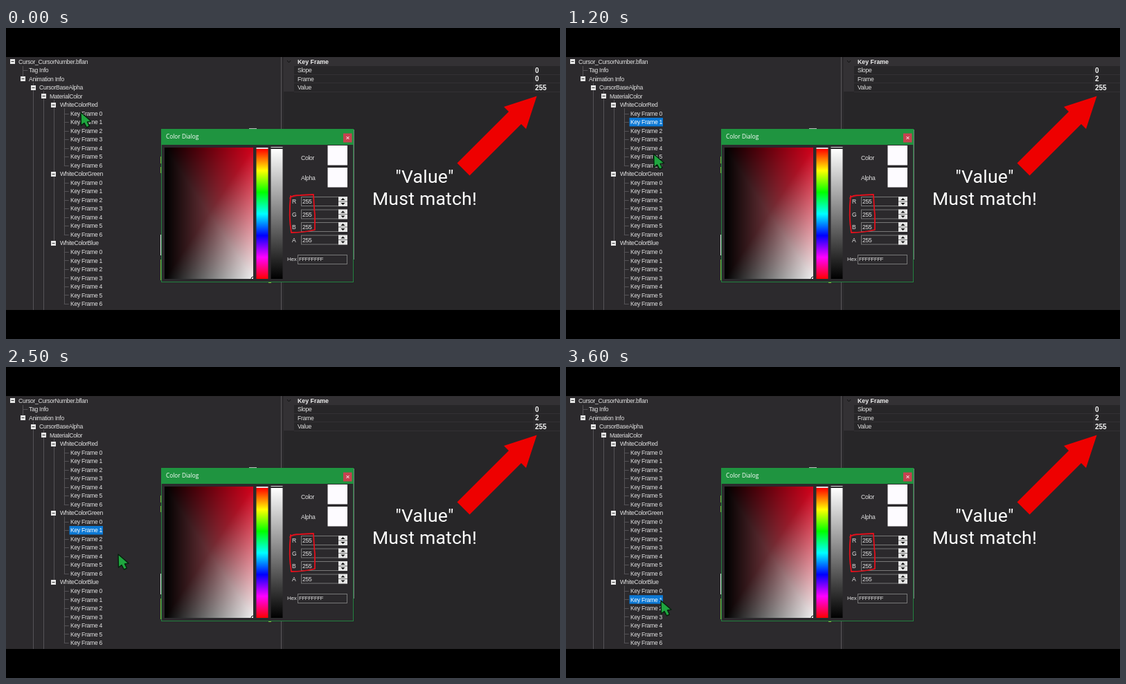
These frames come from a looping animation (800x450 px, 3700 ms). An HTML page with a canvas:

```html
<!DOCTYPE html>
<html>
<head>
<meta charset="utf-8">
<style>
html, body { margin: 0; width: 100%; height: 100%; overflow: hidden; background: #000; }
canvas { display: block; width: 800px; height: 450px; }
</style>
</head>
<body>
<canvas id="stage" width="800" height="450"></canvas>
<script>
const LOOP = 3700, STEP = 100;
const UI = '"Liberation Sans", Arial, sans-serif';
const g = document.getElementById('stage').getContext('2d');
const scene = document.createElement('canvas');
scene.width = 800;
scene.height = 450;

// time, tip x, tip y
const PATH = [
  [0, 108, 122], [300, 110, 124], [600, 119, 136], [900, 122, 140],
  [1100, 126, 165], [1400, 128, 217], [1700, 128, 224], [2000, 135, 238],
  [2200, 136, 241], [2500, 162, 271], [2750, 137, 319], [2900, 135, 323],
  [3200, 137, 336], [3600, 137, 338]
];
// time, selected row
const PICKS = [[0, -1], [300, 6], [900, 7], [1500, 14], [2000, 15], [2800, 22], [3300, 23]];
// time, value of the Frame field
const VALUES = [[0, 0], [1000, 2], [1600, 0], [2200, 2], [2900, 0], [3400, 2]];

const rowY = i => 48.5 + 12.518 * i;

function box(c, x, y, w, h, fill) {
  c.fillStyle = fill;
  c.fillRect(x, y, w, h);
}

function label(c, s, x, mid, o = {}) {
  const { size = 8.6, bold = '', color = '#e2e2e2', gap = -0.29, family = UI, align = 'left' } = o;
  c.font = `${bold} ${size}px ${family}`;
  c.letterSpacing = gap + 'px';
  c.textAlign = align;
  c.textBaseline = 'alphabetic';
  c.fillStyle = color;
  c.fillText(s, x, mid + size * 0.36);
}

function shape(c, pts, fill) {
  c.beginPath();
  pts.forEach(([x, y]) => c.lineTo(x, y));
  c.closePath();
  c.fillStyle = fill;
  c.fill();
}

function drawTree(c) {
  const rows = [['Cursor_CursorNumber.bflan', 0], ['Tag Info', 1], ['Animation Info', 1],
    ['CursorBaseAlpha', 2], ['MaterialColor', 3]];
  for (const tone of ['Red', 'Green', 'Blue']) {
    rows.push(['WhiteColor' + tone, 4]);
    for (let k = 0; k < 7; k++) rows.push(['Key Frame ' + k, 5]);
  }
  const wire = '#555357';
  box(c, 24, 55, 1, 15, wire);
  box(c, 39, 79, 1, 329, wire);
  box(c, 54, 91, 1, 317, wire);
  box(c, 69, 104, 1, 207, wire);
  for (const i of [5, 13, 21]) box(c, 84, rowY(i) + 5, 1, 83, wire);
  rows.forEach(([s, d], i) => {
    const y = rowY(i), x = 9.5 + 14.85 * d;
    if (d === 5 || i === 1) box(c, x, Math.round(y), 7, 1, wire);
    else {
      const bx = Math.round(x - 3.5), by = Math.round(y - 3.5);
      box(c, bx, by, 7, 7, '#e8e8e8');
      box(c, bx + 1.5, by + 3, 4, 1, '#333');
    }
    label(c, s, 18 + 15 * d, y);
  });
}

function drawGrid(c) {
  const line = '#333134';
  box(c, 397, 42, 1, 366, '#59575a');
  box(c, 398, 42, 3, 366, '#2c2a2d');
  box(c, 401, 42, 399, 366, '#272628');
  box(c, 401, 42, 399, 13, line);
  box(c, 401, 55, 15, 37, line);
  for (const y of [67, 79, 92]) box(c, 416, y, 384, 1, line);
  box(c, 762, 55, 1, 37, line);
  c.strokeStyle = '#111';
  c.lineWidth = 1;
  c.beginPath();
  c.moveTo(406, 47); c.lineTo(408.5, 50); c.lineTo(411, 47);
  c.stroke();
  label(c, 'Key Frame', 421, 48.5, { bold: 'bold', size: 8.8, gap: 0, color: '#eee' });
  ['Slope', 'Frame', 'Value'].forEach((s, i) => label(c, s, 421, rowY(i + 1)));
}

function drawValue(c, s, row) {
  label(c, s, 764, rowY(row), { bold: 'bold', size: 10, gap: 0, color: '#f4f4f4' });
}

// four corners blended toward a centre tone
function drawField(c, x0, y0, w, h) {
  const img = c.createImageData(w, h);
  const red = [208, 0, 26], white = [238, 238, 238], mid = [104, 48, 54];
  for (let y = 0; y < h; y++) for (let x = 0; x < w; x++) {
    const nx = 2 * x / (w - 1) - 1, ny = 2 * y / (h - 1) - 1;
    const m = Math.max(Math.abs(nx), Math.abs(ny), 1e-6);
    const u = (nx / m + 1) / 2, v = (ny / m + 1) / 2, p = 4 * (y * w + x);
    for (let k = 0; k < 3; k++) {
      const edge = u * (red[k] * (1 - v) + white[k] * v);
      img.data[p + k] = mid[k] + (edge - mid[k]) * m;
    }
    img.data[p + 3] = 255;
  }
  c.putImageData(img, x0, y0);
}

function ramp(c, x, y, w, h, colors) {
  const grad = c.createLinearGradient(0, y, 0, y + h);
  colors.forEach((s, i) => grad.addColorStop(i / (colors.length - 1), s));
  box(c, x, y, w, h, grad);
}

function drawSpinner(c, name, y) {
  label(c, name, 413, y);
  box(c, 426, y - 7, 67, 14, '#777');
  box(c, 427, y - 6, 53, 12, '#2b292c');
  label(c, '255', 428, y);
  box(c, 480, y - 7, 13, 14, '#e6e6e6');
  box(c, 480, y - 0.5, 13, 1, '#777');
  shape(c, [[486.5, y - 5], [489.5, y - 2], [483.5, y - 2]], '#111');
  shape(c, [[486.5, y + 5], [489.5, y + 2], [483.5, y + 2]], '#111');
}

function drawDialog(c) {
  // slivers of the window behind
  box(c, 223, 186, 1, 10, '#7da83c');
  box(c, 223, 201, 1, 9, '#7da83c');
  box(c, 223, 299, 2, 30, '#ddd');
  box(c, 223, 335, 1, 30, '#7da83c');
  box(c, 351, 145, 11, 1, '#bbb');
  box(c, 502, 147, 1, 188, '#77757a');
  box(c, 379, 367, 4, 2, '#8fb53c');

  box(c, 224, 146, 278, 222, '#23803f');
  box(c, 225, 169, 276, 198, '#2b292c');
  box(c, 224, 146, 278, 23, '#1f9440');
  label(c, 'Color Dialog', 231, 157.5, { size: 8.3, gap: 0, family: '"Open Sans", sans-serif', color: '#fff' });
  box(c, 487, 152.5, 12.5, 13, '#c64350');
  c.strokeStyle = '#fff';
  c.lineWidth = 1;
  c.beginPath();
  c.moveTo(491.5, 157); c.lineTo(495.5, 161);
  c.moveTo(495.5, 157); c.lineTo(491.5, 161);
  c.stroke();

  drawField(c, 229, 173, 128, 190);
  c.strokeStyle = '#111';
  c.beginPath();
  c.arc(357, 363, 3, Math.PI, Math.PI * 1.5);
  c.stroke();
  ramp(c, 361.5, 175, 17, 188, ['#f00', '#ff0', '#0f0', '#0ff', '#00f', '#f0f', '#f00']);
  ramp(c, 382.5, 175, 17, 188, ['#fff', '#000']);
  box(c, 361.5, 173, 17, 2, '#ddd');
  box(c, 382.5, 172, 17, 1, '#ddd');

  label(c, 'Color', 426, 187.5);
  label(c, 'Alpha', 426, 217);
  box(c, 464.5, 170, 28.5, 28.5, '#fdfbff');
  box(c, 464.5, 202, 28.5, 28.5, '#fdfbff');
  ['R', 'G', 'B', 'A'].forEach((s, i) => drawSpinner(c, s, 251 + 18.5 * i));
  label(c, 'Hex', 406, 334.5, { size: 8 });
  box(c, 421, 328, 72, 14, '#777');
  box(c, 422, 329, 70, 12, '#2b292c');
  label(c, 'FFFFFFFF', 423, 334.5, { size: 7.7 });
}

function drawNotes(c) {
  c.strokeStyle = '#e3101c';
  c.lineWidth = 1.8;
  c.lineJoin = c.lineCap = 'round';
  c.beginPath();
  c.moveTo(410, 246);
  c.quadraticCurveTo(413, 242, 425, 242);
  c.lineTo(444, 241);
  c.quadraticCurveTo(445, 262, 446, 270);
  c.lineTo(446, 292);
  c.quadraticCurveTo(430, 296, 412, 296);
  c.quadraticCurveTo(408, 272, 411, 243);
  c.stroke();
  shape(c, [[651.5, 195.5], [726, 121], [719, 114], [766.5, 98.5], [751, 146], [744, 139], [669.5, 213.5]], '#ee0000');
  const big = { size: 26.5, gap: 0.25, family: 'Roboto, sans-serif', color: '#fff', align: 'center' };
  label(c, '"Value"', 604.5, 214.5, big);
  label(c, 'Must match!', 604.5, 246.5, big);
}

function drawPointer(c, x, y) {
  c.save();
  c.translate(x, y);
  c.lineWidth = 1.4;
  c.lineJoin = 'round';
  c.strokeStyle = '#06210d';
  shape(c, [[0, 0], [0.5, 19], [5, 15.5], [8.5, 22], [12.5, 20], [9.5, 14], [15, 13]], '#1fa63f');
  c.stroke();
  c.restore();
}

const held = (list, t) => list.filter(e => e[0] <= t).pop()[1];

function pointerAt(t) {
  const i = PATH.findIndex(p => p[0] > t);
  if (i < 0) return PATH[PATH.length - 1].slice(1);
  const [a, b] = [PATH[i - 1], PATH[i]], k = (t - a[0]) / (b[0] - a[0]);
  return [a[1] + (b[1] - a[1]) * k, a[2] + (b[2] - a[2]) * k];
}

function buildScene() {
  const c = scene.getContext('2d');
  box(c, 0, 0, 800, 450, '#000');
  box(c, 0, 42, 397, 366, '#2c2a2d');
  drawTree(c);
  drawGrid(c);
  drawValue(c, '0', 1);
  drawValue(c, '255', 3);
  drawDialog(c);
  drawNotes(c);
}

function frame(now) {
  const t = Math.floor((now % LOOP) / STEP) * STEP;
  g.drawImage(scene, 0, 0);
  const row = held(PICKS, t);
  if (row > 0) {
    const y = rowY(row);
    box(g, 91.5, y - 6.25, 48.5, 12.5, '#0b78d4');
    label(g, 'Key Frame ' + (row - 6) % 8, 93, y, { color: '#fff' });
  }
  drawValue(g, String(held(VALUES, t)), 2);
  drawPointer(g, ...pointerAt(t));
  requestAnimationFrame(frame);
}

buildScene();
requestAnimationFrame(frame);
</script>
</body>
</html>
```
